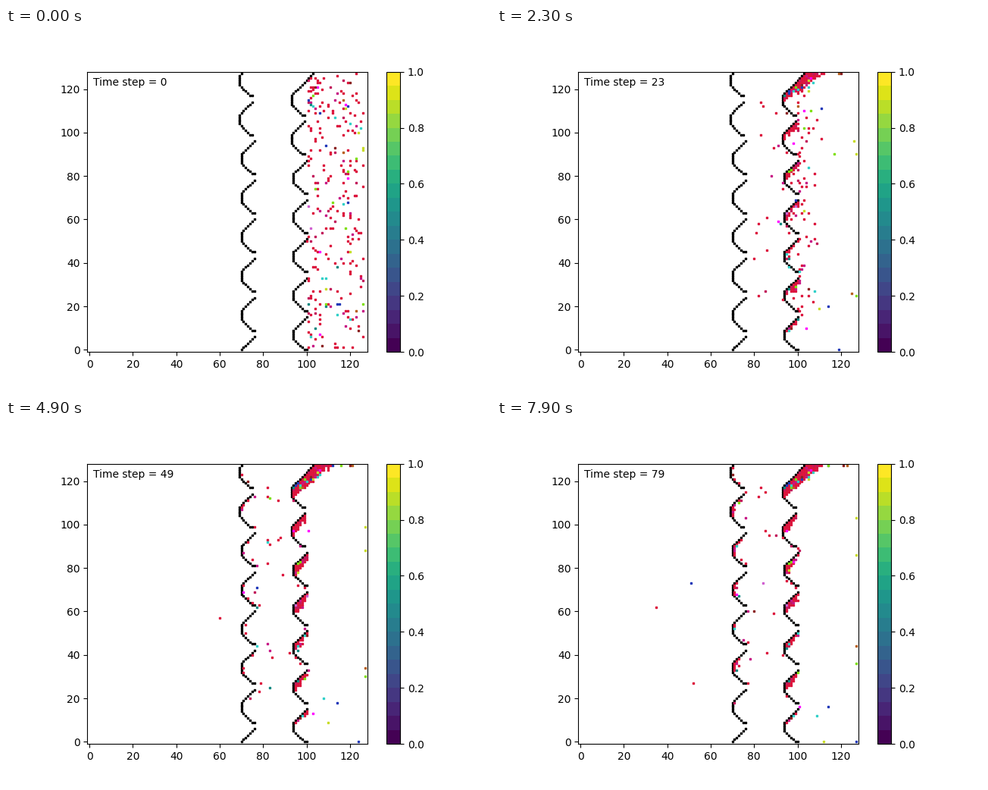
A matplotlib script for the animation above (8000 ms loop, 640x480 px).

```python
import numpy as np
import matplotlib.pyplot as plt
from matplotlib.animation import FuncAnimation
from matplotlib.cm import ScalarMappable

N, STEPS, COUNT, DRIFTERS = 128, 80, 245, 14
rng = np.random.default_rng(12)

COMMON = ["#dc143c", "#c2185b", "#c71585"]
RARE = ["#2038b8", "#c8dc28", "#108880", "#7fe010", "#b8601e",
        "#30d0c8", "#ff00ff", "#8b2020", "#d060d0"]


def arc(x0, y0, size=16):
    """Cells of one scallop that opens to the right."""
    cells = {(x0 + 6, y0)}
    for j in range(size):
        cells.add((x0 + max(5 - j, 0, j - 9), y0 + j))
    return {(x, y) for x, y in cells if 0 <= y < N}


walls, plugs = set(), set()
for k in range(8):
    y0 = 18 * k - 9
    x0 = 69 if y0 > 90 else 70
    walls |= arc(x0, y0)
    plugs |= {(x0 + 6, y) for y in (y0 + 16, y0 + 17) if y < N}
for k in range(7):
    walls |= arc(93 if k > 4 else 94, 18 * k, 20 if k == 6 else 16)

busy = np.zeros((N, N), bool)
for cell in walls | plugs:
    busy[cell] = True


def free(x, y):
    return 0 <= x < N and 0 <= y < N and not busy[x, y]


def seed():
    cells = []
    while len(cells) < COUNT:
        x = 101 + int(26 * rng.random() ** 1.25)
        y = int(rng.integers(1, N))
        if free(x, y) and x > y - 24:
            busy[x, y] = True
            cells.append((x, y))
    return cells


def choose(minus, plus):
    r = rng.random()
    return -1 if r < minus else int(r < minus + plus)


def advance(cells):
    """Biased random walk, one particle per cell, up and to the left."""
    for i in rng.permutation(COUNT):
        x, y = cells[i]
        busy[x, y] = False
        inside = x >= 94
        dx = -1 if x > 117 else choose(.89, .09 if inside else .03)
        dy = choose(.04, .9) if inside else choose(.22, .4)
        if free(x + dx, y):
            x += dx
        if free(x, y + dy):
            y += dy
        busy[x, y] = True
        cells[i] = x, y


def walk():
    cells, history = seed(), []
    for _ in range(STEPS):
        history.append(list(cells))
        advance(cells)
    return np.array(history)


def lines(start, velocity):
    steps = np.arange(STEPS)[:, None, None]
    return np.clip(np.round(start + velocity * steps), 0, N - 1)


def drift():
    """Slow loners that wander about the right-hand side."""
    start = rng.uniform((105, 0), (127, N), (DRIFTERS, 2))
    return lines(start, rng.normal((.06, 0), (.1, .6), (DRIFTERS, 2)))


def escape():
    """The few that get past both walls."""
    end = np.array([(35, 62), (52, 27), (51, 73)])
    start = end + rng.uniform((60, -25), (75, 5), end.shape)
    return lines(start, (end - start) / (STEPS - 1))


positions = np.concatenate([walk(), drift(), escape()], axis=1)
colors = np.concatenate([
    np.where(rng.random(COUNT) < .84,
             rng.choice(COMMON, COUNT, p=[.8, .12, .08]), rng.choice(RARE, COUNT)),
    rng.choice(RARE, DRIFTERS),
    [COMMON[0], COMMON[0], RARE[0]],
])

fig, ax = plt.subplots(figsize=(6.4, 4.8), dpi=100)
ax.set(xlim=(-1, N), ylim=(-1, N), aspect="equal")
fig.colorbar(ScalarMappable(cmap=plt.get_cmap("viridis", 20)), ax=ax)


def squares(color):
    return ax.plot([], [], "s", color=color, markersize=2)[0]


squares("black").set_data(*zip(*sorted(walls)))
groups = [(squares(c), colors == c) for c in COMMON + RARE]
label = ax.text(.02, .95, "", transform=ax.transAxes)


def update(step):
    for dots, members in groups:
        dots.set_data(*positions[step, members].T)
    label.set_text(f"Time step = {step}")
    return [dots for dots, _ in groups] + [label]


anim = FuncAnimation(fig, update, frames=STEPS, interval=100, repeat=True, repeat_delay=0)
plt.show()
```
